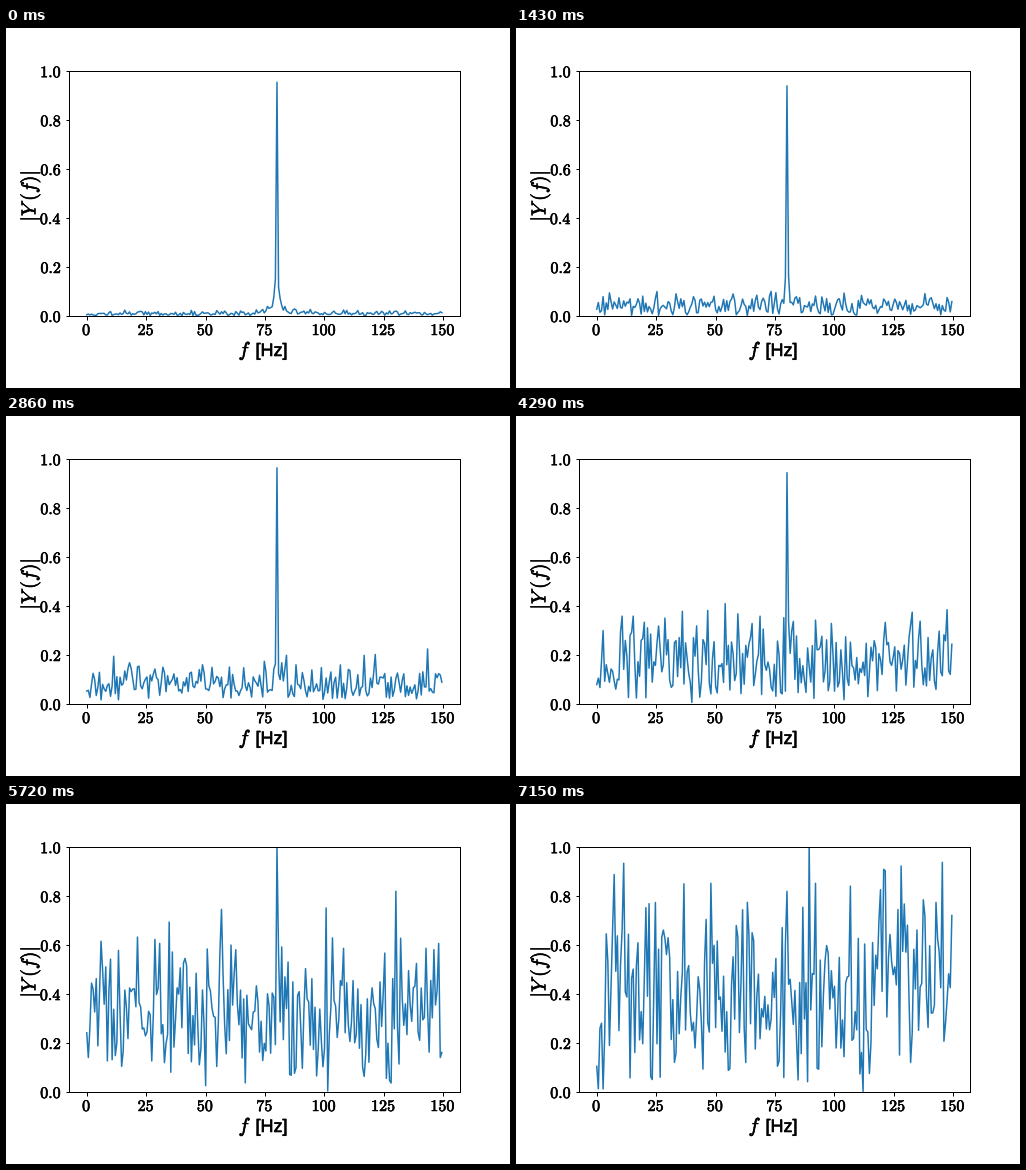
Animation, 504 px wide and 360 px high, one loop 8 s. Source, as a matplotlib script:

```python
import matplotlib.pyplot as plt
import numpy as np
from matplotlib.animation import FuncAnimation
from matplotlib.patheffects import withStroke

W, H, DPI = 504, 360, 72
LOOP, STEP, HOLD = 8000, 20, 1430

plt.rcParams.update({
    "mathtext.fontset": "cm",
    "font.family": "Liberation Sans",
    "font.size": 16,
    "axes.labelsize": 20,
    "axes.linewidth": 1.0,
    "xtick.major.width": 1.0,
    "ytick.major.width": 1.0,
})

# One-sided spectrum with a pure tone near 80 Hz
BINS, TONE, LEAK = 225, 120, 0.13
freq = np.linspace(0, 149.5, BINS)

# Noise level, tone height, and the bin and height of the largest noise peak
LEVELS = [
    (0.008, 0.955, 107, 0.025),
    (0.036, 0.94, 38, 0.10),
    (0.072, 0.965, 215, 0.225),
    (0.145, 0.945, 81, 0.41),
    (0.27, 1.0, 195, 0.82),
    (0.345, 0.82, 134, 1.02),
]


def spectrum(seed, sigma, tone, top_bin, top):
    rng = np.random.default_rng(seed)
    noise = rng.rayleigh(sigma, BINS) % (0.95 * top)
    phase = np.exp(2j * np.pi * rng.random(BINS))
    leak = LEAK / np.abs(np.arange(BINS) - TONE + LEAK)
    y = np.abs(leak + noise * phase)
    y[top_bin] = top
    y[TONE] = tone
    return y


spectra = [spectrum(20 + i, *level) for i, level in enumerate(LEVELS)]

fig, ax = plt.subplots(figsize=(W / DPI, H / DPI), dpi=DPI)
fig.subplots_adjust(left=0.125, right=0.9, top=0.88, bottom=0.2)
line, = ax.plot(freq, spectra[0], color="#1f77b4", lw=1.5)

margin = 0.05 * freq[-1]
ax.set_xlim(-margin, freq[-1] + margin)
ax.set_ylim(0, 1)
xticks = range(0, 151, 25)
yticks = np.linspace(0, 1, 6)
ax.set_xticks(xticks, [f"${v}$" for v in xticks])
ax.set_yticks(yticks, [f"${v:.1f}$" for v in yticks])
ylabel = ax.set_ylabel(r"$|Y\hspace{0.2}(f)|$", labelpad=-2.5, y=0.49)


def label(x, y, text, size):
    return fig.text(x / W, 1 - y / H, text, size=size, va="baseline")


texts = [ylabel, label(232.5, 328, "$f$", 20), label(249.5, 328, "[Hz]", 18),
         *ax.get_xticklabels(), *ax.get_yticklabels()]
for text in texts:
    text.set_path_effects([withStroke(linewidth=0.6, foreground="black")])


def update(n):
    # Switch on the tick that holds each change time
    line.set_ydata(spectra[(n * STEP + STEP // 2) // HOLD])
    return line,


anim = FuncAnimation(fig, update, frames=LOOP // STEP, interval=STEP,
                     repeat=True, repeat_delay=0, blit=False)
plt.show()
```
